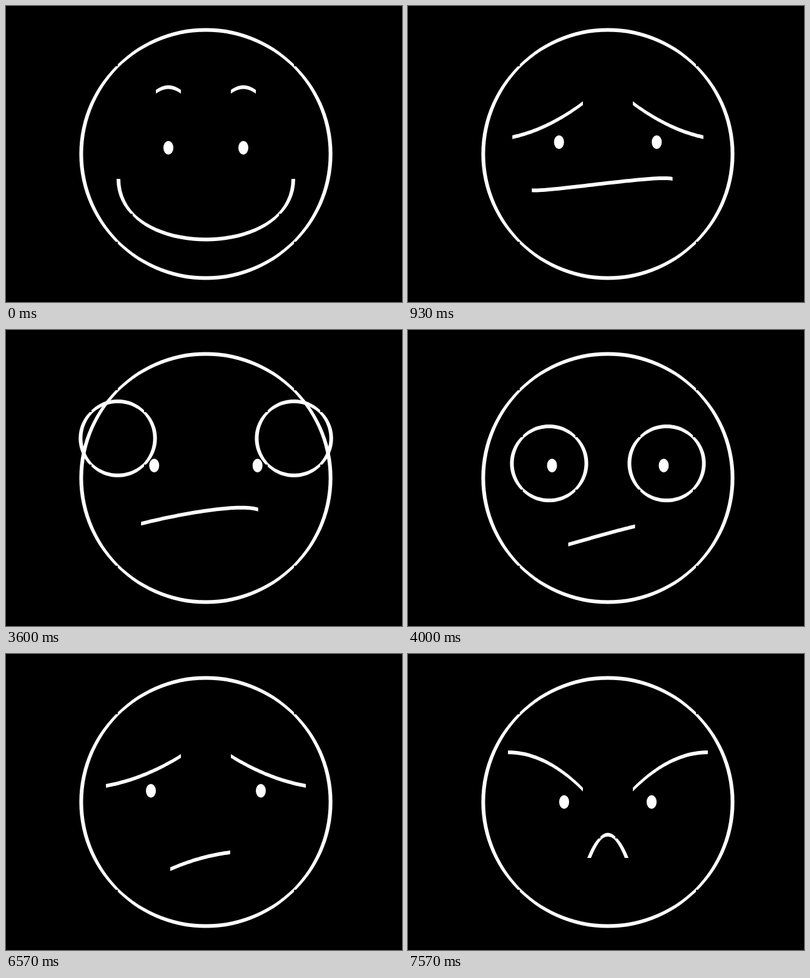
An HTML page with a canvas for the animation above (8 s loop, 634 by 476 pixels).

```html
<!DOCTYPE html>
<html lang="en">
<head>
<meta charset="utf-8">
<title>Moods</title>
<style>
  html, body { margin: 0; width: 100%; height: 100%; overflow: hidden; background: #000; }
  canvas { display: block; }
</style>
</head>
<body>
<canvas id="stage" width="634" height="476"></canvas>
<script>
const ctx = document.getElementById('stage').getContext('2d');
const LOOP = 8000, FPS = 30, CENTER = 320, PEN = 3;

// An arc has a middle, a width, a tilt (rise of its right end, downwards),
// a sag in the middle, a skew of that sag, and a roundness of its ends.
const arc = (x, y, width, tilt, sag, skew = 0, round = 0) =>
  ({ x, y, width, tilt, sag, skew, round });
const point = (x, y) => ({ x, y });

// Left brow, eye and rim; the right ones are mirrored.
const happy = {
  brow: arc(260, 138, 40, 0, -7.5),
  eye: point(260, 228),
  mouth: arc(320, 278, 280, 0, 97.5, 0, 1)
};
const sad = {
  brow: arc(220, 188, 120, -60, 9),
  eye: point(240, 218),
  mouth: arc(310, 288, 220, -20, -11, -9, 0.6),
  rim: point(160, 158)
};
const stunned = {
  brow: sad.brow,
  eye: point(230, 218),
  mouth: arc(310, 333, 100, -30, 0),
  rim: point(230, 218)
};
const angry = {
  brow: arc(220, 188, 120, 60, -15),
  eye: point(250, 238),
  mouth: arc(320, 328, 60, 0, -37.5)
};
const moods = [
  { mood: happy, since: 0 },
  { mood: sad, since: 600 },
  { mood: stunned, since: 3600 },
  { mood: angry, since: 6560 }
];

function mix(a, b, rest) {
  const out = {};
  for (const key in b) out[key] = b[key] + (a[key] - b[key]) * rest;
  return out;
}

// A pen of constant width, measured upright on flat pieces and sideways on steep ones.
function trace(count, pointAt) {
  let [ax, ay] = pointAt(0);
  ctx.beginPath();
  for (let i = 1; i <= count; i++) {
    const [bx, by] = pointAt(i / count);
    const dx = bx - ax, dy = by - ay;
    const flat = Math.abs(dx) >= Math.abs(dy);
    const ox = flat ? 0 : -PEN * Math.sign(dy);
    const oy = flat ? PEN * Math.sign(dx) : 0;
    ctx.moveTo(ax - ox, ay - oy);
    ctx.lineTo(bx - ox, by - oy);
    ctx.lineTo(bx + ox, by + oy);
    ctx.lineTo(ax + ox, ay + oy);
    ctx.closePath();
    [ax, ay] = [bx, by];
  }
  ctx.fill();
}

function circle({ x, y }, r) {
  trace(120, t => {
    const angle = t * 2 * Math.PI;
    return [x + r * Math.cos(angle), y + r * Math.sin(angle)];
  });
}

function curve({ x, y, width, tilt, sag, skew, round }) {
  trace(40, t => {
    const smooth = t * t * (3 - 2 * t);
    const along = t + round * (smooth - t) - 0.5;
    const bulge = 4 * t * (1 - t) * (sag + skew * (2 * t - 1));
    return [x + width * along, y + tilt * (t - 0.5) + bulge];
  });
}

function dot({ x, y }) {
  ctx.beginPath();
  ctx.ellipse(x, y, 8, 11, 0, 0, 2 * Math.PI);
  ctx.fill();
}

// Draws a shape, then its mirror image on the other side of the face.
function pair(shape) {
  shape();
  ctx.save();
  ctx.translate(2 * CENTER, 0);
  ctx.scale(-1, 1);
  shape();
  ctx.restore();
}

function draw(elapsed) {
  const frame = Math.floor((elapsed % LOOP + 4) * FPS / 1000);
  const time = frame * 1000 / FPS;
  const index = moods.findLastIndex(m => m.since <= time + 1);
  const to = moods[index].mood;
  const from = moods[Math.max(index - 1, 0)].mood;
  // A tenth of the remaining way, sixty times a second; a new mood every three seconds.
  const steps = (time - 550 - 3000 * (index - 1)) * 0.06;
  const rest = 0.9 ** steps;
  const part = name => mix(from[name], to[name], rest);

  ctx.fillStyle = '#000';
  ctx.fillRect(0, 0, 634, 476);
  ctx.fillStyle = '#fff';
  circle({ x: CENTER, y: 238 }, 199.6);
  curve(part('mouth'));
  pair(() => {
    dot(part('eye'));
    if (to === stunned) circle(part('rim'), 59.6);
    else curve(part('brow'));
  });
}

const start = performance.now();
function tick() {
  draw(performance.now() - start);
  requestAnimationFrame(tick);
}
tick();
</script>
</body>
</html>
```
